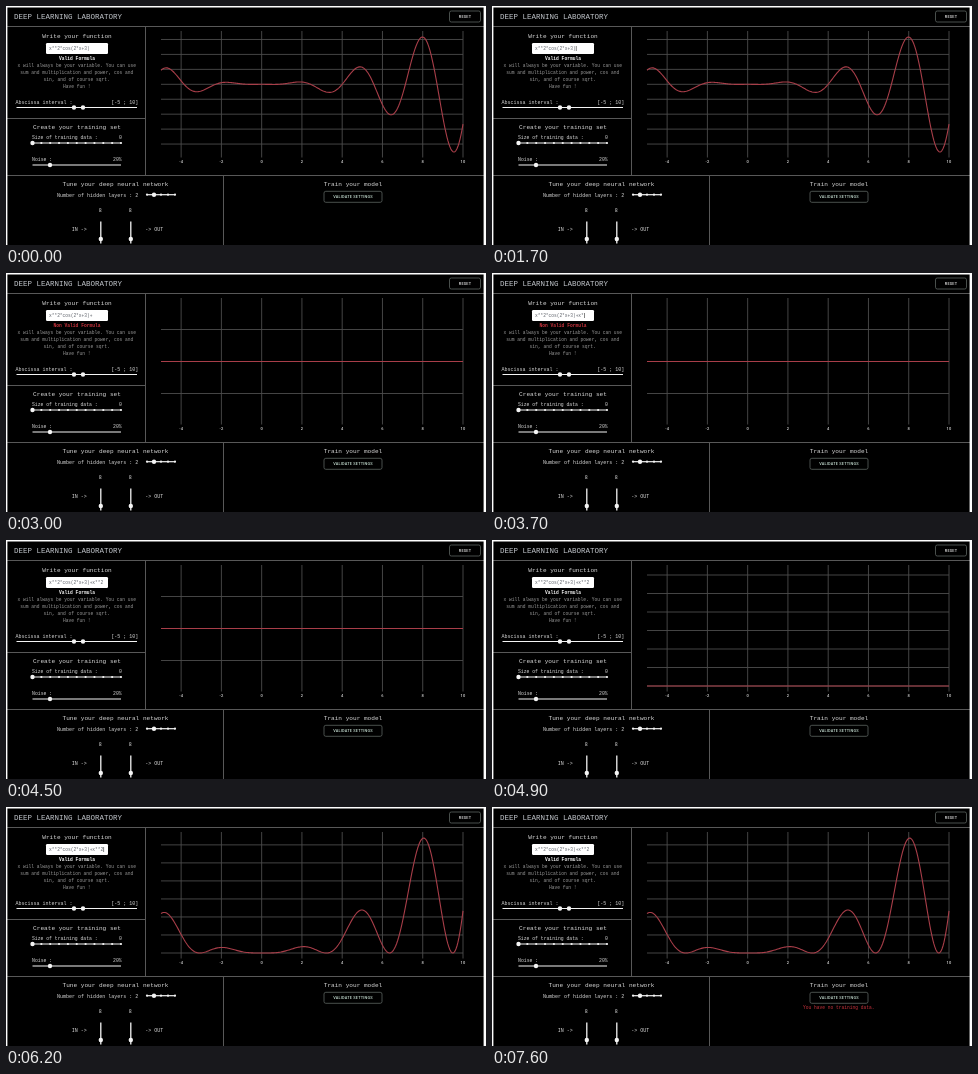
Recreate the animation shown at these times as an HTML page. Size 480x239 px, loop 8000 ms.

```html
<!DOCTYPE html>
<html lang="en">
<head>
<meta charset="utf-8">
<title>Deep learning laboratory</title>
<style>
html, body { margin: 0; width: 100%; height: 100%; overflow: hidden; background: #000; }
svg { display: block; width: 100%; height: 100%; }
text { font-family: "Liberation Mono", monospace; fill: #d8d8d8; white-space: pre; }
.sans { font-family: Roboto, sans-serif; font-weight: 500; letter-spacing: .17px; }
</style>
</head>
<body>
<svg id="stage" viewBox="0 0 480 239"></svg>
<script>
const LOOP = 8000, RED = '#a83e49', WHITE = '#f4f4f4', EDGE = '#585858', GRID = '#4c4c4c';
const FORMULA = 'x**2*cos(2*x+3)+x**2';
const stage = document.getElementById('stage');

function add(tag, attrs, parent = stage) {
  const node = document.createElementNS('http://www.w3.org/2000/svg', tag);
  for (const key in attrs) node.setAttribute(key, attrs[key]);
  parent.append(node);
  return node;
}
// Colour goes inline because the stylesheet outranks the fill attribute.
function text(str, x, y, size, { fill = '', ...attrs } = {}) {
  const node = add('text', { x, y, 'font-size': size, ...attrs });
  node.style.fill = fill;
  node.textContent = str;
  return node;
}
const centred = (str, x, y, size, attrs) => text(str, x, y, size, { 'text-anchor': 'middle', ...attrs });
const line = (x1, y1, x2, y2, stroke, width, parent) =>
  add('line', { x1, y1, x2, y2, stroke, 'stroke-width': width }, parent);
const rect = (x, y, width, height, attrs) => add('rect', { x, y, width, height, ...attrs });
const dot = (cx, cy, r) => add('circle', { cx, cy, r, fill: WHITE });

function slider(x1, x2, y, thumbs, steps = 0) {
  line(x1, y, x2, y, WHITE, 1.2);
  for (let i = 0; i <= steps && steps; i++) dot(x1 + (x2 - x1) * i / steps, y, 1.1);
  thumbs.forEach(x => dot(x, y, 2.2));
}
function button(label, x, y, w, fill) {
  rect(x, y, w, 11, { rx: 1.8, fill: '#000', stroke: '#5c6460', 'stroke-width': .8 });
  centred(label, x + w / 2, y + 6.9, 3.9, { class: 'sans', fill });
}

// Panels
rect(0, 0, 480, 239, { fill: '#000' });
line(0, 20.5, 478, 20.5, EDGE, 1);
line(0, 169.5, 478, 169.5, EDGE, 1);
line(0, 112.5, 139.5, 112.5, EDGE, 1);
line(139.5, 20.5, 139.5, 169.5, EDGE, 1);
line(217.5, 169.5, 217.5, 239, EDGE, 1);
line(0, .7, 480, .7, '#fff', 1.4);
line(.7, 0, .7, 239, '#fff', 1.4);
line(478.8, 0, 478.8, 239, '#fff', 2.4);

text('DEEP LEARNING LABORATORY', 8, 13, 7.5, { fill: '#c2c6cc' });
button('RESET', 443.5, 5, 31, '#e4e4e4');

// Function panel
centred('Write your function', 71, 32, 6.1);
rect(40, 37, 62, 11, { rx: 1.3, fill: '#fff' });
const input = text('', 43, 44, 4.53, { fill: '#5c6068' });
const caret = rect(0, 40, .6, 5, { fill: '#333' });
const verdict = centred('', 71, 53.7, 4.6, { 'font-weight': 'bold' });
['x will always be your variable. You can use',
 'sum and multiplication and power, cos and',
 'sin, and of course sqrt.',
 'Have fun !'].forEach((s, i) => centred(s, 70.7, 60.6 + 7.2 * i, 4.6, { fill: '#999' }));
text('Abscissa interval :', 9.6, 98, 5);
text('[-5 ; 10]', 105.2, 98, 5);
slider(10.5, 131, 101.5, [68, 77]);

// Training set panel
centred('Create your training set', 71, 122.6, 6.1);
text('Size of training data :', 26, 132.7, 4.76);
text('0', 113, 132.7, 4.8);
slider(26.5, 115, 137, [26.5], 10);
text('Noise :', 26, 155.1, 4.8);
text('20%', 107, 155.1, 4.8);
slider(26.5, 115, 159, [44]);

// Network panel
centred('Tune your deep neural network', 109.5, 180.3, 6.1);
text('Number of hidden layers : 2', 51, 190.5, 5.03);
slider(141, 169, 188.7, [148], 4);
for (const x of [94.8, 124.8]) {
  centred('8', x - .6, 206, 5);
  line(x, 215.5, x, 237.5, WHITE, 1.3);
  dot(x, 233, 2.2);
}
text('IN ->', 65.7, 225, 5);
text('-> OUT', 139.3, 225, 5);

// Training panel
centred('Train your model', 347, 180.3, 6.1);
button('VALIDATE SETTINGS', 318, 185.3, 58, '#c4dcd0');
const error = centred('You have no training data.', 346.7, 201.9, 4.58, { fill: '#c8323c' });

// Chart
const px = x => 155 + (x + 5) * 302 / 15;
const wave = x => x * x * Math.cos(2 * x + 3);
for (let x = -4; x <= 10; x += 2) {
  line(px(x), 25, px(x), 151.5, GRID, .9);
  centred(x, px(x), 157, 4, { class: 'sans' });
}
function chart(fn, zero, scale, ticks) {
  const group = add('g', {});
  ticks.forEach(v => line(155, zero - v * scale, 457, zero - v * scale, GRID, .9, group));
  let d = '';
  for (let x = -5; x <= 10.001; x += .05)
    d += (d ? 'L' : 'M') + px(x).toFixed(2) + ' ' + (zero - fn(x) * scale).toFixed(2);
  add('path', { d, fill: 'none', stroke: RED, 'stroke-width': 1.1, 'stroke-linejoin': 'round' }, group);
  return group;
}
const range = (from, to, step) => Array.from({ length: (to - from) / step + 1 }, (_, i) => from + i * step);
const flat = () => 0;
const charts = [
  [0, chart(wave, 78.3, .747, range(-80, 60, 20))],
  [3000, chart(flat, 88.5, 32, [-1, 0, 1])],
  [4900, chart(flat, 146, 18.5, range(0, 6, 1))],
  [5000, chart(x => wave(x) + x * x, 146, .901, range(0, 120, 20))]
];

// [start, value] steps
const typed = [[0, 15], [2500, 16], [3200, 17], [3700, 18], [3900, 19], [4500, 20]];
const carets = [[0, 0], [1700, 1], [2200, 0], [2500, 1], [2800, 0], [3200, 1], [3400, 0],
  [3700, 1], [4100, 0], [5000, 1], [5700, 0], [6200, 1], [6800, 0]];
const at = (steps, t) => steps.filter(s => s[0] <= t).pop()[1];
const show = (node, on) => node.setAttribute('visibility', on ? 'visible' : 'hidden');

function draw(now) {
  const t = now % LOOP, count = at(typed, t);
  const valid = ![16, 18, 19].includes(count);
  input.textContent = FORMULA.slice(0, count);
  caret.setAttribute('x', 43.1 + count * 2.718);
  show(caret, at(carets, t));
  verdict.textContent = valid ? 'Valid Formula' : 'Non Valid Formula';
  verdict.style.fill = valid ? WHITE : '#c8323c';
  const current = at(charts, t);
  charts.forEach(([, group]) => show(group, group === current));
  show(error, t >= 7600);
}

const start = performance.now();
function tick() {
  draw(performance.now() - start);
  requestAnimationFrame(tick);
}
tick();
</script>
</body>
</html>
```
